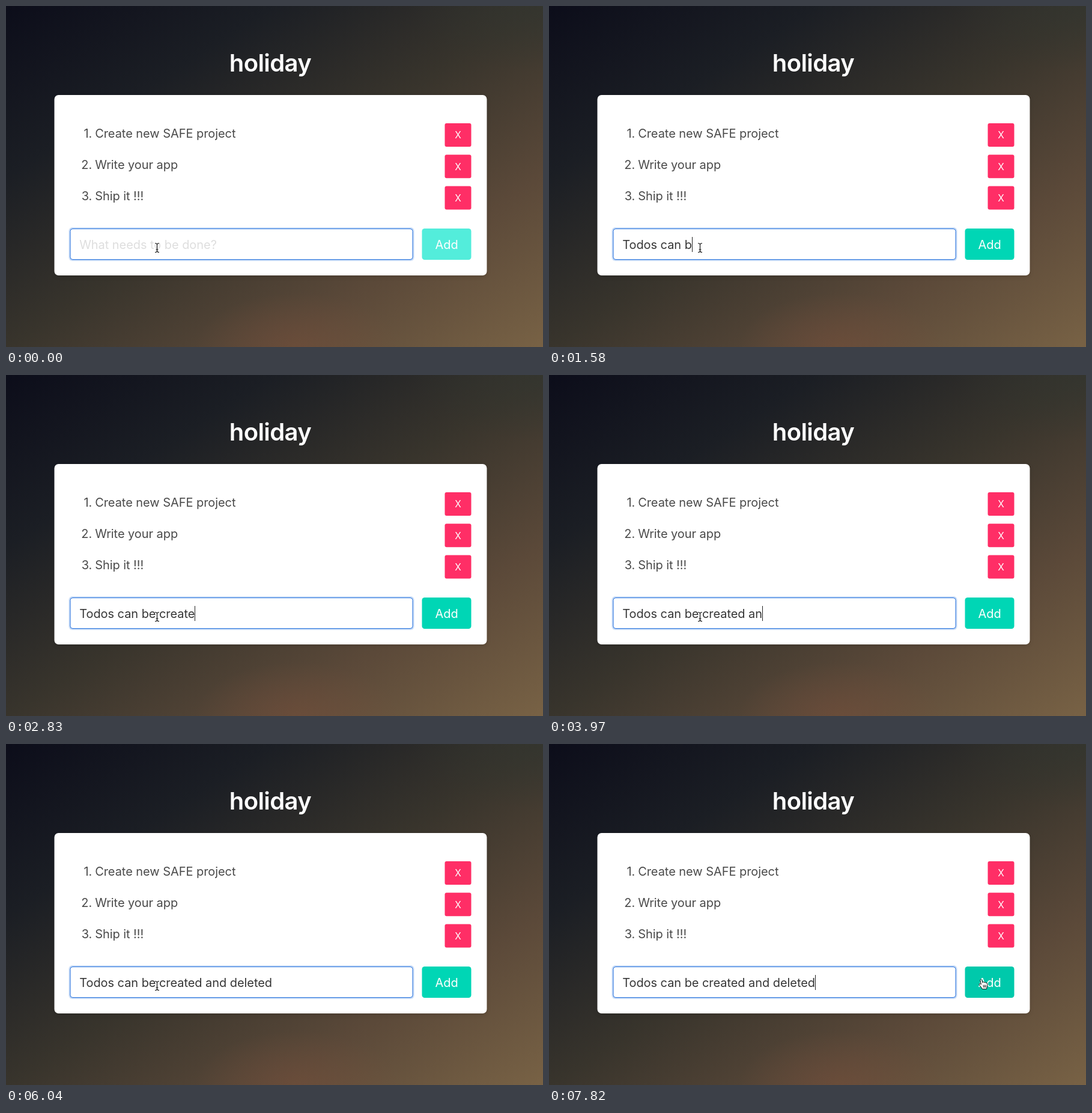
Write an HTML page that moves like this. It is 894 px wide and 567 px high and loops after 8000 ms.

```html
<!DOCTYPE html>
<html lang="en">
<head>
<meta charset="utf-8">
<title>Todo list</title>
<style>
  html, body { margin: 0; width: 100%; height: 100%; overflow: hidden; }
  body {
    background:
      radial-gradient(ellipse 170px 90px at 485px 567px, rgba(116, 78, 58, .55), transparent),
      radial-gradient(ellipse 220px 110px at 894px 0, rgba(50, 54, 48, .6), transparent),
      linear-gradient(to bottom right, #0c0d1a, #1b1e24 25%, #38342c 50%, #5b4939 75%, #786245);
  }
  svg { display: block; width: 100%; height: 100%; }
  text {
    font: 20px Inter, "Open Sans", sans-serif;
    font-optical-sizing: none;
    letter-spacing: -.06px;
    white-space: pre;
    fill: #4a4a4a;
  }
  .title { font-size: 40px; font-weight: 600; letter-spacing: -.6px; }
  .x { font-size: 15.5px; }
  .mid { text-anchor: middle; fill: #fff; }
  .num { text-anchor: end; }
  .card { filter: drop-shadow(0 2px 3px rgba(10, 10, 10, .15)); }
</style>
</head>
<body>
<svg viewBox="0 0 894 567">
  <text class="title mid" x="440" y="109">holiday</text>
  <rect class="card" x="80.5" y="148" width="720" height="300" rx="7" fill="#fff"/>
  <g id="list"></g>
  <rect x="104.5" y="368" width="575" height="56" rx="6" fill="#c8dcf7"/>
  <rect x="107" y="370.5" width="570" height="51" rx="4" fill="#fff" stroke="#236fdc"/>
  <text id="entry" x="122.2" y="404"></text>
  <rect id="caret" y="384" width="1" height="25" fill="#222"/>
  <rect id="add" x="692.5" y="370" width="82" height="52" rx="4.5"/>
  <text class="mid" x="733.6" y="404">Add</text>
  <g id="beam" fill="none">
    <path id="bar" d="M-3.5-7.5Q0-7.5 0-5Q0-7.5 3.5-7.5M0-5V5M-3.5 7.5Q0 7.5 0 5Q0 7.5 3.5 7.5M-2 3H2" stroke="#fff" stroke-width="3"/>
    <path d="M-3.5-7.5Q0-7.5 0-5Q0-7.5 3.5-7.5M0-5V5M-3.5 7.5Q0 7.5 0 5Q0 7.5 3.5 7.5M-2 3H2" stroke="#111" stroke-width="1.2"/>
  </g>
  <g id="hand" stroke="#111" stroke-linejoin="round" stroke-linecap="round">
    <path fill="#fff" d="M-2 7.5C-3 4.5-6.5 2.5-6.8 0C-6.8-1.6-5-1.6-3.6.4L-5-6.2C-5.3-8.6-2.8-8.8-2.2-6.6L-1.1-2.8C-.8-4.4 1.4-4.4 1.8-2.6C2.4-3.9 4.3-3.6 4.6-1.9C5.4-2.7 6.9-2.2 6.9-.4C7 2.6 6 4.4 5.6 7.5Z"/>
    <path d="M0 1.6L.5 5M2 1.4L2.3 5M4 1.4V5" fill="none" stroke-width=".9"/>
  </g>
</svg>
<script>
const LOOP = 8000;
const PHRASE = "Todos can be created and deleted";
const KEYS = [
  120, 450, 630, 750, 870, 980, 1090, 1200, 1300, 1400, 1580, 1760, 1940,
  2180, 2420, 2510, 2600, 2720, 2830, 3070, 3250, 3370, 3970, 4090, 4210,
  5040, 5220, 5330, 5430, 5580, 5690, 5920
];
const CARET_ON = [...KEYS, 6640, 7740];
const CARET_OFF = [0, 390, 1520, 2120, 2680, 3790, 4390, 4930, 5490, 6040, 7170];
const MOVE = { start: 7170, step: 59, count: 12 };

const $ = id => document.getElementById(id);
const past = (times, t) => times.filter(k => k <= t);
const latest = (times, t) => past(times, t).pop() ?? -1;
const show = (el, on) => el.setAttribute("visibility", on ? "visible" : "hidden");

$("list").innerHTML = ["Create new SAFE project", "Write your app", "Ship it !!!"].map((item, i) => {
  const y = i * 52.2;
  return `<text class="num" x="143.2" y="${218.6 + y}">${i + 1}.</text>
    <text x="148.2" y="${218.6 + y}">${item}</text>
    <rect x="730.5" y="${195 + y}" width="44" height="39" rx="3" fill="#ff2e66"/>
    <text class="mid x" x="752.5" y="${220.4 + y}">X</text>`;
}).join("");

function drawEntry(t) {
  // one letter is typed, erased and typed again
  const retry = t >= 4390 && t < 4930;
  const typed = PHRASE.slice(0, past(KEYS, t).length + retry);
  const entry = $("entry");
  entry.textContent = typed || "What needs to be done?";
  entry.style.fill = typed ? "#363636" : "#dedede";
  $("caret").setAttribute("x", Math.round(122.2 + entry.getComputedTextLength() - .3));
  show($("caret"), latest(CARET_ON, t) > latest(CARET_OFF, t));
  return typed;
}

function drawPointer(t) {
  const steps = Math.floor((t - MOVE.start) / MOVE.step) + 1;
  const p = Math.min(1, Math.max(0, steps / MOVE.count));
  const ease = p * p * (3 - 2 * p);
  const x = 251.5 + 471.5 * ease;
  const y = 402 - 2.5 * ease + 5 * Math.sin(Math.PI * ease);
  const over = x > 692;
  for (const id of ["beam", "hand"]) {
    $(id).setAttribute("transform", `translate(${x} ${y})`);
    show($(id), over === (id === "hand"));
  }
  return over;
}

function frame(now) {
  const t = now % LOOP;
  const typed = drawEntry(t);
  const over = drawPointer(t);
  $("add").setAttribute("fill", !typed ? "#53eddb" : over ? "#00c9ab" : "#00d6b5");
  requestAnimationFrame(frame);
}
frame(0);
</script>
</body>
</html>
```
